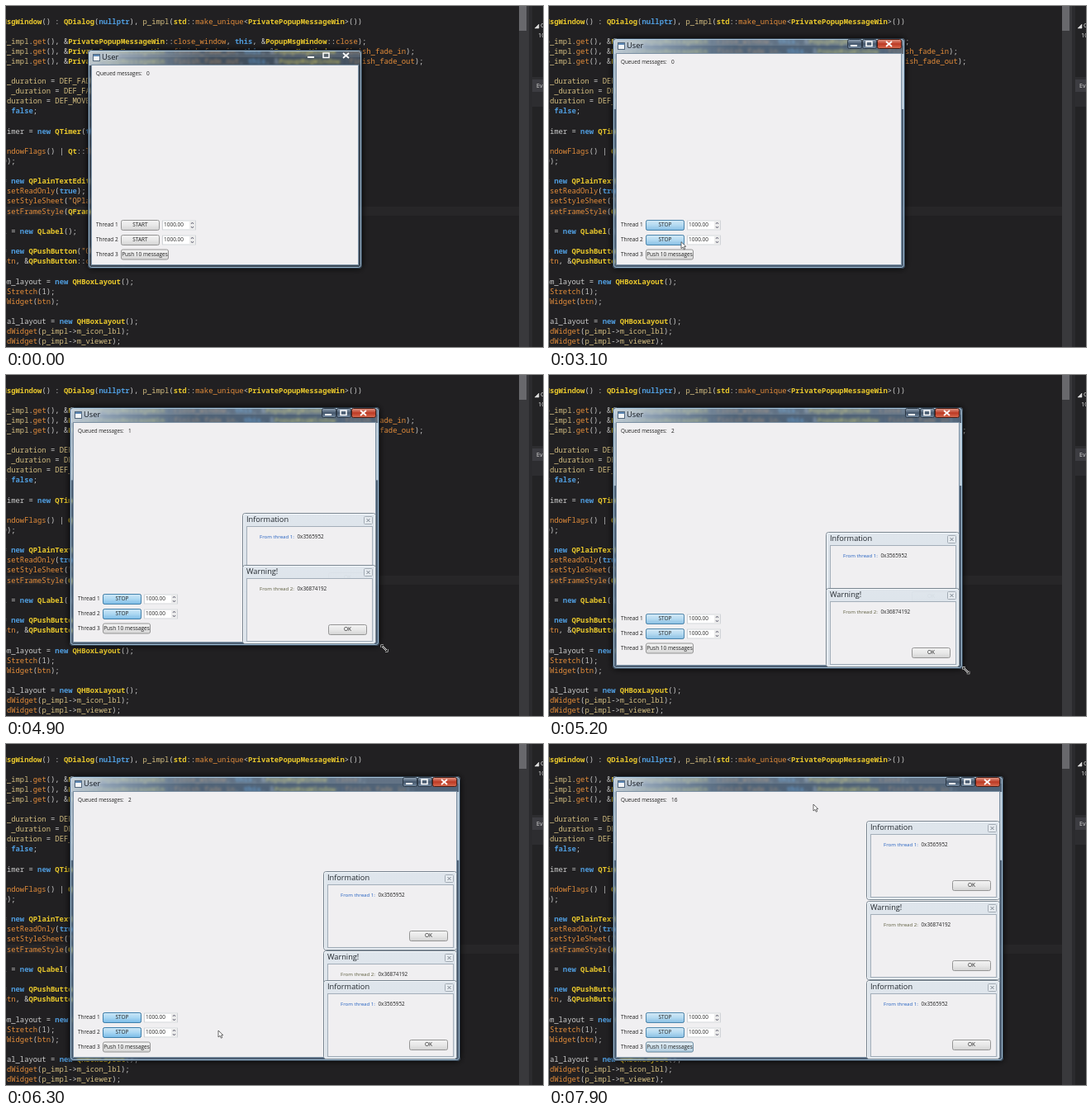
Animation of 650 by 413 pixels, one loop 8000 ms. Source, as an HTML page with a canvas:

```html
<!DOCTYPE html>
<html lang="en">
<head>
<meta charset="utf-8">
<title>Popup message queue</title>
<style>
html, body { margin: 0; width: 650px; height: 413px; overflow: hidden; background: #212022; }
canvas { display: block; }
</style>
</head>
<body>
<canvas id="stage" width="650" height="413"></canvas>
<script>
const stage = document.getElementById('stage');
const desktop = document.createElement('canvas');
desktop.width = 650;
desktop.height = 413;
let g = desktop.getContext('2d');

const LOOP = 8000, CHAR = 5.31, PITCH = 96.5;
const UI = '"Open Sans", "Noto Sans", sans-serif';
const MONO = '"Noto Sans Mono", "DejaVu Sans Mono", monospace';

function rect(x, y, w, h, fill, stroke) {
  if (fill) { g.fillStyle = fill; g.fillRect(x, y, w, h); }
  if (stroke) { g.strokeStyle = stroke; g.lineWidth = 1; g.strokeRect(x + .5, y + .5, w - 1, h - 1); }
}
function rounded(x, y, w, h, r, fill, stroke) {
  g.beginPath();
  g.roundRect(x + .5, y + .5, w - 1, h - 1, r);
  if (fill) { g.fillStyle = fill; g.fill(); }
  if (stroke) { g.strokeStyle = stroke; g.lineWidth = 1; g.stroke(); }
}
function text(s, x, y, size = 6.5, color = '#222', align = 'left') {
  g.font = `${size}px ${UI}`;
  g.textAlign = align;
  g.textBaseline = 'middle';
  g.fillStyle = color;
  g.fillText(s, x, y);
}
function path(points, stroke, width = 1, fill) {
  g.beginPath();
  points.forEach(([x, y]) => g.lineTo(x, y));
  if (fill) { g.closePath(); g.fillStyle = fill; g.fill(); }
  g.strokeStyle = stroke;
  g.lineWidth = width;
  g.stroke();
}
function vertical(y, h, ...colors) {
  const grad = g.createLinearGradient(0, y, 0, y + h);
  colors.forEach((c, i) => grad.addColorStop(i / (colors.length - 1), c));
  return grad;
}
// Linear interpolation between rows of [time, ...values]
function track(keys, t) {
  const i = keys.findIndex(k => k[0] > t);
  if (i === 0) return keys[0].slice(1);
  if (i < 0) return keys[keys.length - 1].slice(1);
  const a = keys[i - 1], b = keys[i], p = (t - a[0]) / (b[0] - a[0]);
  return a.slice(1).map((v, n) => v + (b[n + 1] - v) * p);
}
const ramp = (t, from, span) => Math.max(0, Math.min(1, (t - from) / span));

// Each line: column, vertical centre, text
const code = [
  [0, 19, 'MsgWindow() : QDialog(nullptr), p_impl(std::make_unique<PrivatePopupMessageWin>())'],
  [0, 43, 'p_impl.get(), &PrivatePopupMessageWin::close_window, this, &PopupMsgWindow::close);'],
  [0, 55, 'p_impl.get(), &PrivatePopupMessageWin::finish_fade_in, this, &PopupMsgWindow::finish_fade_in);'],
  [0, 67, 'p_impl.get(), &PrivatePopupMessageWin::finish_fade_out, this, &PopupMsgWindow::finish_fade_out);'],
  [1, 91, '_duration = DEF_FADE_DURATION;'],
  [2, 103, '_duration = DEF_FADE_DURATION;'],
  [1, 115, 'duration = DEF_MOVE_DURATION;'],
  [0, 127, '= false;'],
  [0, 152, 'timer = new QTimer(this);'],
  [1, 176, 'ndowFlags() | Qt::Tool);'],
  [0, 188, '0);'],
  [0, 212, '= new QPlainTextEdit();'],
  [1, 224, 'setReadOnly(true);'],
  [1, 236, 'setStyleSheet("QPlainTextEdit");'],
  [1, 249, 'setFrameStyle(QFrame::NoFrame);'],
  [0, 273, 'l = new QLabel();'],
  [0, 297, '= new QPushButton("OK");'],
  [0, 309, 'btn, &QPushButton::clicked);'],
  [0, 334, 'om_layout = new QHBoxLayout();'],
  [0, 346, 'dStretch(1);'],
  [0, 358, 'dWidget(btn);'],
  [1, 382, 'al_layout = new QHBoxLayout();'],
  [1, 394, 'dWidget(p_impl->m_icon_lbl);'],
  [1, 406, 'dWidget(p_impl->m_viewer);']
];
function tokenStyle(token, rest) {
  if (/^(new|this|nullptr|true|false)$/.test(token)) return ['#4f9bdc', 600];
  if (/^(Q[A-Za-z]+|Private\w+|PopupMsg\w+|std|MsgWindow)$/.test(token)) return ['#e8c72c', 600];
  if (/^"/.test(token)) return ['#e0954a', 500];
  if (/^(p_impl|m_\w+|DEF\w+|\w*duration)$/.test(token)) return ['#d3bd80', 500];
  if (/^[a-z]\w+$/i.test(token) && /^[(<),]/.test(rest)) return ['#e38c3a', 500];
  return ['#cdcdcd', 500];
}
function drawDesktop() {
  rect(0, 0, 650, 413, '#212022');
  rect(0, 243, 621, 11, '#272628');
  g.textBaseline = 'middle';
  for (const [col, y, line] of code) {
    for (const m of line.matchAll(/"[^"]*"|\w+|[^\s\w]/g)) {
      const [color, weight] = tokenStyle(m[0], line.slice(m.index + m[0].length));
      g.font = `${weight} 8.85px ${MONO}`;
      g.fillStyle = color;
      g.fillText(m[0], -4.4 + (col + m.index) * CHAR, y);
    }
  }
  rect(621, 0, 12, 413, '#39393c');
  rect(621, 0, 9, 30, '#68686c');
  rect(633, 0, 4, 413, '#2b2b2e');
  rect(637, 0, 13, 413, '#232325');
  rect(637, 86, 13, 3, '#2d2d30');
  rect(637, 89, 13, 15, '#3c3c41');
  rect(637, 104, 13, 18, '#2d2d30');
  path([[640, 27], [645, 27], [645, 22]], '#ddd', .5, '#ddd');
  text('Q', 647, 24, 8, '#e5e5e5');
  text('10', 644, 36, 7.5, '#ddd');
  text('Ev', 642, 97, 7, '#ddd');
}

function button(x, y, w, label, blue = 0) {
  rounded(x, y, w, 13, 2, vertical(y, 13, '#f4f4f4', '#e8e8e8', '#d2d2d2'), '#959595');
  if (blue) {
    g.save();
    g.globalAlpha *= blue;
    rounded(x, y, w, 13, 2, vertical(y, 13, '#cfe8f7', '#a6d6f3', '#70b7e7'), '#3a7dab');
    g.restore();
  }
  text(label, x + w / 2, y + 6.5, 6.5, '#222', 'center');
}

function threadRow(x, y, n, running, blue, caret) {
  text(`Thread ${n}`, x + 9, y);
  button(x + 39, y - 6.5, 47, running ? 'STOP' : 'START', blue);
  rect(x + 89, y - 6, 41, 12, '#fff', '#d0d3d7');
  text('1000.00', x + 91, y);
  rect(x + 122, y - 5, 7, 10, '#ececec');
  path([[x + 124, y - 1.5], [x + 125.5, y - 3.5], [x + 127, y - 1.5]], '#667', 1);
  path([[x + 124, y + 1.5], [x + 125.5, y + 3.5], [x + 127, y + 1.5]], '#667', 1);
  if (caret) rect(x + 102, y - 4, 1, 8, '#000');
}

function titleButtons(r, top, active) {
  const y = top;
  if (active) {
    rounded(r - 69, y, 18, 12, 2, vertical(y, 12, '#9fb0c2', '#44566b', '#7d92a8'), '#2c3947');
    rounded(r - 51, y, 18, 12, 2, vertical(y, 12, '#9fb0c2', '#44566b', '#7d92a8'), '#2c3947');
    rounded(r - 33, y, 30, 12, 2, vertical(y, 12, '#e6a594', '#bd3a24', '#da7358'), '#4a1d14');
  }
  rect(r - 65, top + 7, 8, 2, '#fff');
  g.strokeStyle = '#fff';
  g.lineWidth = 1.5;
  g.strokeRect(r - 46, top + 3, 7, 5.5);
  path([[r - 22, top + 3], [r - 15, top + 9]], '#fff', 1.7);
  path([[r - 15, top + 3], [r - 22, top + 9]], '#fff', 1.7);
}

function glassFrame(l, top, w, h, active) {
  g.save();
  g.shadowColor = '#000';
  g.shadowBlur = 9;
  rounded(l, top, w, h, 4, '#263443');
  g.restore();

  g.save();
  g.beginPath();
  g.roundRect(l, top, w, h, 4);
  g.clip();
  g.filter = 'blur(1.6px)';
  g.drawImage(desktop, 0, 0);
  g.filter = 'none';
  rect(l, top, w, h, active ? 'rgba(112,146,180,.55)' : 'rgba(92,120,150,.45)');
  const shine = g.createLinearGradient(l, 0, l + 150, 0);
  shine.addColorStop(0, 'rgba(215,226,238,.8)');
  shine.addColorStop(.3, 'rgba(185,203,222,.6)');
  shine.addColorStop(1, 'rgba(150,175,200,.06)');
  rect(l, top, w, 19, shine);
  rect(l, top, w, 9, 'rgba(255,255,255,.1)');
  if (active) {
    rect(l, top + 19, 5, h * .24, 'rgba(222,235,246,.6)');
    rect(l + w - 5, top + 19, 5, h * .24, 'rgba(222,235,246,.75)');
  }
  g.restore();
  rounded(l, top, w, h, 4, null, '#2c3a48');
  rounded(l + 1, top + 1, w - 2, h - 2, 3, null, 'rgba(180,212,236,.8)');
}

function mainWindow(t, l, top, r, b, rowBase, queued) {
  const active = t >= 1500;
  glassFrame(l - 1, top - 1, r - l + 2, b - top + 2, active);

  rect(l + 5, top + 4, 9, 9, '#f4f6f8', '#53677c');
  rect(l + 6, top + 5, 7, 2, '#5c88b5');
  g.save();
  g.shadowColor = 'rgba(255,255,255,.8)';
  g.shadowBlur = 5;
  text('User', l + 16, top + 9, 9.3, '#10161c');
  g.restore();
  titleButtons(r, top, active);

  rect(l + 3, top + 17, r - l - 6, b - top - 20, '#7c90a3');
  rect(l + 4, top + 18, r - l - 8, b - top - 22, '#f0eff1');
  text('Queued messages:', l + 9, top + 28, 6.3);
  text(queued, l + 70, top + 28);

  const glow = .85 + .15 * Math.sin(t / 320);
  threadRow(l, rowBase - 51.5, 1, t >= 2500, t >= 2500 ? glow : 0);
  threadRow(l, rowBase - 33.5, 2, t >= 2900, t >= 2900 ? glow : 0, t >= 1700 && t < 2500);
  text('Thread 3', l + 9, rowBase - 16);
  button(l + 39, rowBase - 22.5, 58, 'Push 10 messages', t >= 6700 ? glow * .5 : 0);
}

function popup(x, y, warning, alpha) {
  if (!alpha) return;
  g.save();
  g.globalAlpha = alpha;
  rounded(x - 1, y, 162, 96, 3, vertical(y, 96, 'rgba(222,229,236,.95)', '#dbe2e9'), '#78848f');
  rounded(x, y + 1, 160, 94, 2, null, '#f4f8fb');
  rect(x + 4, y + 16, 153, 77, '#f0eff1', '#a3aeb9');
  text(warning ? 'Warning!' : 'Information', x + 4, y + 8.5, 9.2, '#20262c');
  rounded(x + 146, y + 4, 11, 10, 1, '#e6ebf0', '#a2abb4');
  path([[x + 149.5, y + 7], [x + 153.5, y + 11]], '#7b858f', 1);
  path([[x + 153.5, y + 7], [x + 149.5, y + 11]], '#7b858f', 1);
  text(`From thread ${warning ? 2 : 1}:`, x + 20, y + 29, 6.1, warning ? '#5c5c3c' : '#2360c0');
  text(warning ? '0x36874192' : '0x3565952', x + 65.5, y + 29, 6.3);
  button(x + 103, y + 72, 47, 'OK');
  g.restore();
}

function arrow(x, y) {
  const shape = [[0, 0], [0, 8], [2, 6.3], [3.4, 9.2], [4.7, 8.6], [3.5, 5.8], [5.8, 5.6]];
  path(shape.map(([a, b]) => [x + a, y + b]), '#444', .8, '#fff');
}
function resizeCursor(x, y) {
  const ends = s => [[x + s * 3.5, y + s], [x + s * 3.5, y + s * 3.5], [x + s, y + s * 3.5]];
  for (const [color, width] of [['#fff', 2], ['#111', .9]]) {
    path([[x - 3.5, y - 3.5], [x + 3.5, y + 3.5]], color, width);
    path(ends(1), color, width);
    path(ends(-1), color, width);
  }
}

const topLeftKeys = [[1500, 100, 54], [1700, 78, 40]];
const cornerKeys = [[4200, 430, 317], [4800, 442, 322.5], [4900, 451, 327], [5000, 470, 338],
  [5500, 546, 381], [5700, 549, 383]];
const slideInfo = [[4020, 0], [4100, 6], [4900, 63], [5700, 77], [5900, PITCH]];
const slideWarning = [[5900, 0], [6300, 36], [6950, PITCH]];
const pointerKeys = [
  [100, 451, 274], [300, 440, 120], [500, 400, 31], [700, 260, 68], [900, 188, 97],
  [1200, 98, 52], [1500, 98, 52], [1700, 76, 38], [1900, 149, 287], [2300, 150, 266],
  [2500, 150, 266], [2900, 150, 285], [3200, 165, 286], [3800, 440, 326], [4000, 428, 316],
  [4200, 428, 317], [4900, 458, 331], [5000, 476, 341], [5500, 548, 383], [5750, 549, 384],
  [5950, 480, 399], [6300, 257, 347], [6700, 148, 366], [7050, 148, 366], [7900, 320, 73]
];
// Time and change of the queue length
const queueSteps = [[3600, 1], [4000, -1], [4500, 1], [5000, 1], [5500, 1], [5900, -1],
  [6400, 1], [6600, 1], [6900, 10], [7400, 1], [7600, 1]];

function draw(t) {
  g.drawImage(desktop, 0, 0);
  const [l, top] = track(topLeftKeys, t).map(Math.round);
  const [r, b] = track(cornerKeys, t).map(Math.round);
  // The bottom rows are laid out one repaint behind the frame
  const rowBase = Math.round(track(cornerKeys, t - 100)[1]);
  const queued = queueSteps.reduce((n, [at, d]) => n + (t >= at ? d : 0), 0);
  mainWindow(t, l, top, r, b, rowBase, queued);

  const x = r - 164, rest = b - 97;
  const [a] = track(slideInfo, t), [c] = track(slideWarning, t);
  popup(x, Math.round(rest - a - c), false, ramp(t, 3400, 400));
  popup(x, Math.round(rest - c), true, ramp(t, 4000, 500));
  popup(x, rest, false, ramp(t, 5900, 400));

  if (t < 100) return;
  const [px, py] = track(pointerKeys, t);
  const resizing = (t >= 1200 && t <= 1700) || (t >= 4000 && t <= 5750);
  (resizing ? resizeCursor : arrow)(px, py);
}

drawDesktop();
g = stage.getContext('2d');
const start = performance.now();
function tick() {
  const t = (performance.now() - start) % LOOP;
  draw(Math.floor(t / 100) * 100);
  requestAnimationFrame(tick);
}
tick();
</script>
</body>
</html>
```
